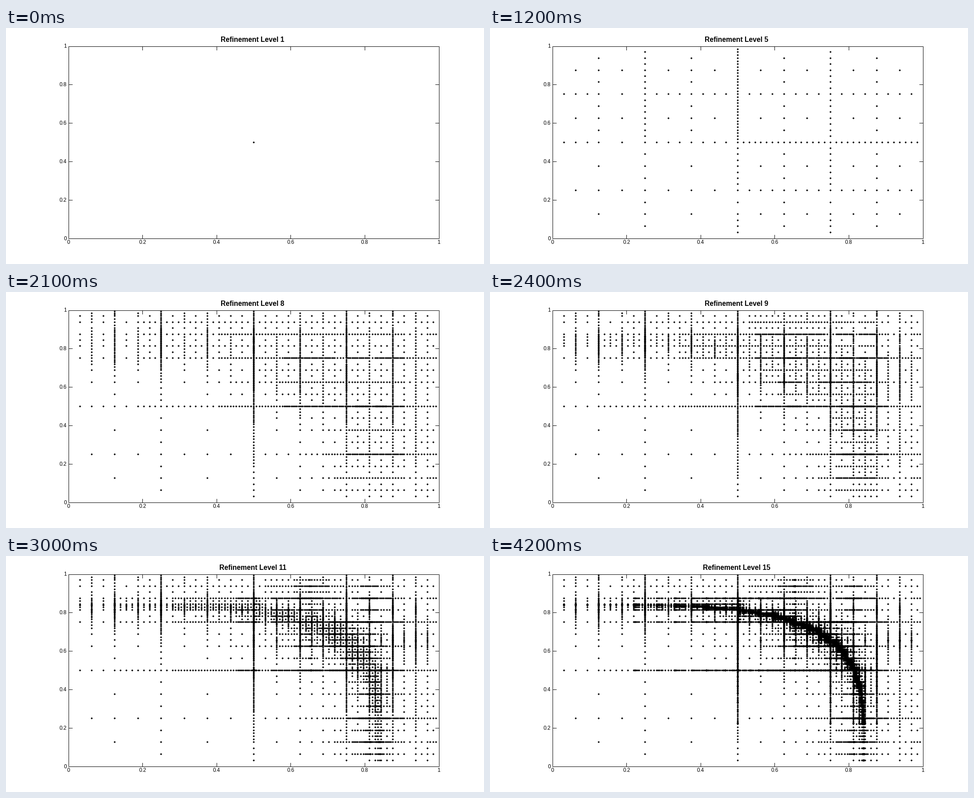
Recreate the animation shown at these times as a matplotlib script. Size 1062x527 px, loop 4500 ms.

```python
import matplotlib.pyplot as plt
from matplotlib.animation import FuncAnimation

W, H, DPI = 1062, 527, 100
PX = 72 / DPI
LEFT, RIGHT, TOP, BOTTOM = 138.5, 961.5, 40.5, 469.5
TICK = 8
N = 1 << 18          # grid coordinates are integers in (0, N)
TOLERANCE = 0.01
DEPTHS = [1, 2, 3, 4] + list(range(6, 17))

plt.rcParams["font.family"] = "Liberation Sans"


def f(i, j):
    """Function with a kink along x^4 + y^4 = 1/2."""
    return 1 / (abs(0.5 - (i / N) ** 4 - (j / N) ** 4) + 0.1)


def stencil(p):
    """Weights of the 1D hierarchical surplus, extrapolating at the boundary."""
    h = p & -p
    if h == N // 2:
        return [(p, 1)]
    if h == N // 4:
        return [(p, 1), (N // 2, -1)]
    if p == h:
        return [(p, 1), (2 * h, -1.5), (4 * h, 0.5)]
    if p + h == N:
        return [(p, 1), (p - h, -1.5), (p - 3 * h, 0.5)]
    return [(p, 1), (p - h, -0.5), (p + h, -0.5)]


def surplus(i, j):
    return sum(a * b * f(x, y) for x, a in stencil(i) for y, b in stencil(j))


def children(i, j):
    a, b = (i & -i) // 2, (j & -j) // 2
    return [(i - a, j), (i + a, j), (i, j - b), (i, j + b)]


def parent(p):
    h = p & -p
    if h == N // 2:
        return None
    left = p - h
    return left if left & -left == 2 * h else p + h


def insert(point, grid, added):
    """Add a point together with all its missing ancestors."""
    if point in grid:
        return
    grid.add(point)
    added.append(point)
    i, j = point
    for ancestor in ((parent(i), j), (i, parent(j))):
        if None not in ancestor:
            insert(ancestor, grid, added)


def build_grids(depth):
    grid, fresh = set(), []
    insert((N // 2, N // 2), grid, fresh)
    points = list(fresh)
    grids = [points]
    for _ in range(depth - 1):
        added = []
        for point in fresh:
            if abs(surplus(*point)) > TOLERANCE:
                for child in children(*point):
                    insert(child, grid, added)
        points = points + added
        grids.append(points)
        fresh = added
    return grids


def to_x(u):
    return LEFT + (RIGHT - LEFT) * u


def to_y(v):
    return BOTTOM - (BOTTOM - TOP) * v


fig = plt.figure(figsize=(W / DPI, H / DPI), dpi=DPI, facecolor="white")
ax = fig.add_axes([0, 0, 1, 1])
ax.set_xlim(0, W)
ax.set_ylim(H, 0)
ax.axis("off")


def line(xs, ys):
    ax.plot(xs, ys, color="black", lw=PX, antialiased=False, solid_capstyle="butt")


def label(x, y, text, size, **style):
    return ax.text(x, y, text, fontsize=size * PX, color="black", va="baseline", **style)


line([LEFT, RIGHT, RIGHT, LEFT, LEFT], [TOP, TOP, BOTTOM, BOTTOM, TOP])
for k in range(6):
    x, y, text = to_x(k / 5), to_y(k / 5), f"{k / 5:g}"
    label(x, 482.5, text, 11.6, ha="center")
    label(134.8, y + 4, text, 11.6, ha="right")
    if 0 < k < 5:
        for edge, step in ((TOP, TICK), (BOTTOM, -TICK)):
            line([x, x], [edge, edge + step])
        for edge, step in ((LEFT, TICK), (RIGHT, -TICK)):
            line([edge, edge + step], [y, y])

title = label(548, 31, "", 15.5, ha="center", weight="bold")
dots, = ax.plot([], [], "D", color="black", ms=3.25 * PX, mew=0, antialiased=False)
grids = build_grids(DEPTHS[-1])


def update(frame):
    points = grids[DEPTHS[frame] - 1]
    dots.set_data([to_x(i / N) for i, _ in points],
                  [to_y(j / N) - 0.5 for _, j in points])
    title.set_text(f"Refinement Level {frame + 1}")
    return dots, title


anim = FuncAnimation(fig, update, frames=len(DEPTHS), interval=300,
                     repeat=True, repeat_delay=0)
plt.show()
```
